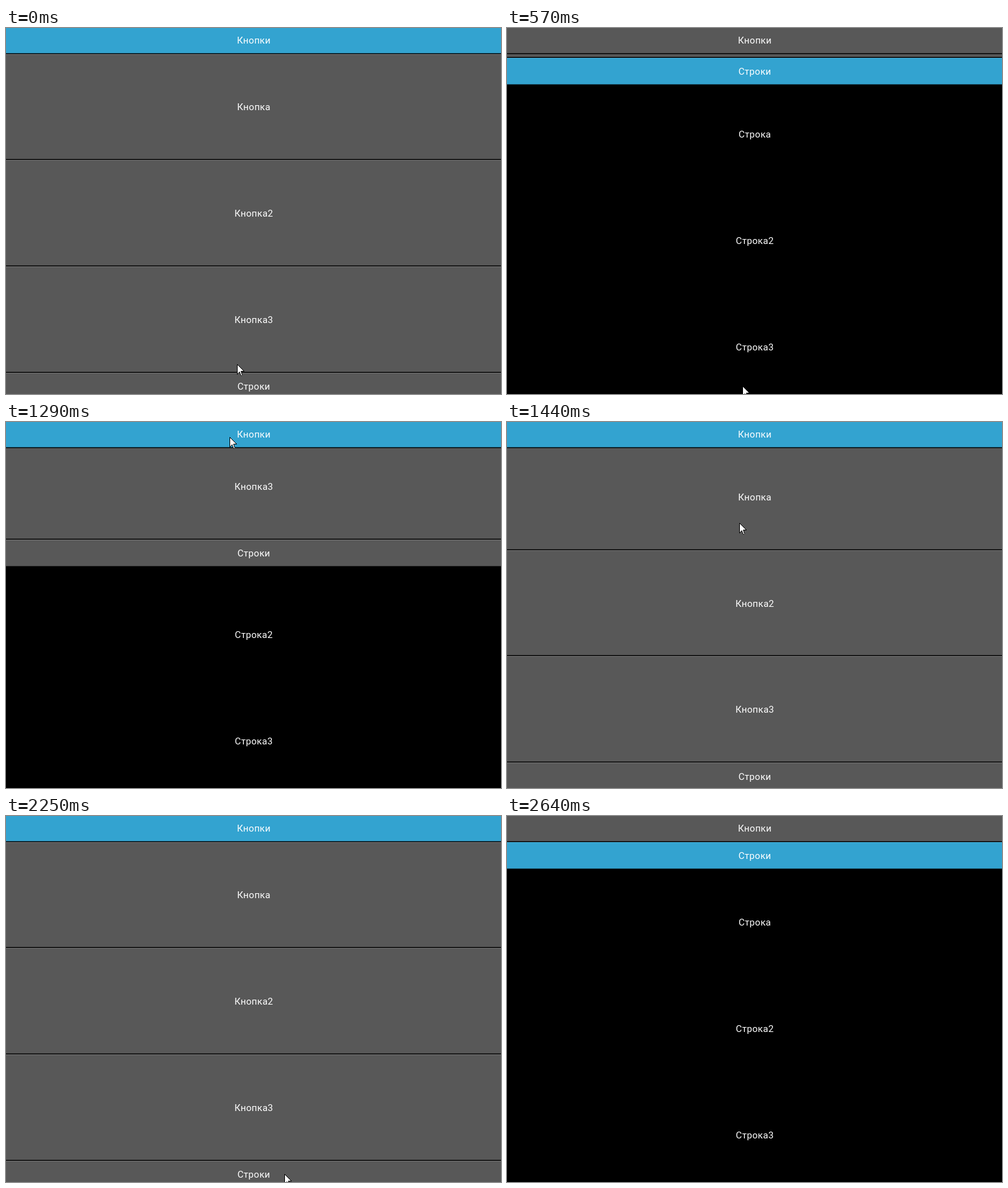
An HTML page with a canvas that plays this animation: 795x588 px, repeating every 3040 ms.

```html
<!DOCTYPE html>
<html lang="ru">
<meta charset="utf-8">
<title>Accordion</title>
<style>
html, body { margin: 0; width: 100%; height: 100%; overflow: hidden; background: #000 }
canvas { display: block }
</style>
<canvas id="stage" width="795" height="588"></canvas>
<script>
const W = 795, H = 588, LOOP = 3040, TOP = 42, BAR = 44, OPEN = 512, ROW = OPEN / 3;
const STEP = 140, EASE = 240;
const ctx = document.getElementById('stage').getContext('2d');
const GRAY = ['#585858', '#777', '#303030'];
const BLUE = ['#33a3d0', '#47b2dc', '#1c5971'];
const arrow = new Path2D('M.5 .5V16.5L4 12.5L6.5 18.5H7.5L8.5 17.5L6.5 11.5H11.5Z');

// Each act opens one section (lead: eased time already passed) and moves
// the pointer along key points [step, x, y].
const acts = [
  { start: 0, lead: EASE, lower: false, path: [[0, 371, 540], [2, 378, 575]] },
  { start: 420, lead: 11.85, lower: true,
    path: [[1, 378, 575], [2, 404, 529], [3, 363, 31], [4, 355, 9], [5, 359, 24]] },
  { start: 1290, lead: 11.75, lower: false,
    path: [[0, 359, 24], [2, 387, 300], [3, 436, 516], [5, 436, 540], [7, 447, 575]] },
  { start: 2370, lead: 23.7, lower: true, path: [[0, 447, 575], [1, 447, H]] }
];

function along(path, step) {
  const i = path.findIndex(p => p[0] >= step);
  if (i < 0) return path[path.length - 1].slice(1);
  const b = path[i], a = path[i - 1] || b;
  const k = a === b ? 0 : (step - a[0]) / (b[0] - a[0]);
  return [1, 2].map(j => Math.round(a[j] + (b[j] - a[j]) * k));
}

const easeOut = p => p >= 1 ? 1 : 1 - 2 ** (-10 * p);

function label(text, y) {
  ctx.fillStyle = '#fff';
  ctx.fillText(text, 398, Math.round(y + 5));
}

function band(color, y, h) {
  ctx.fillStyle = color;
  ctx.fillRect(0, y, W, h);
}

function button(text, top, height, [face, light, shade]) {
  const y = Math.floor(top), end = Math.floor(top + height);
  band(face, y, end - y);
  band(light, y, 1);
  band(shade, end - 2, 1);
  band('#000', end - 1, 1);
  label(text, top + height / 2);
}

function clipped(top, bottom, paint) {
  ctx.save();
  ctx.beginPath();
  ctx.rect(0, top, W, Math.max(0, bottom - top));
  ctx.clip();
  for (let i = 0; i < 3; i++) paint(i * ROW, i ? i + 1 : '');
  ctx.restore();
}

function pointer(x, y) {
  ctx.save();
  ctx.translate(x, y);
  ctx.fillStyle = '#fff';
  ctx.strokeStyle = '#000';
  ctx.fill(arrow);
  ctx.stroke(arrow);
  ctx.restore();
}

function draw(t) {
  const { start, lead, lower, path } = acts.filter(a => a.start <= t).pop();
  const step = Math.floor((t - start + 20) / STEP);
  const k = easeOut((step * STEP + lead) / EASE);
  const split = TOP + OPEN * (lower ? 1 - k : k);
  const edge = Math.floor(split);
  band('#000', 0, H);

  clipped(TOP, edge, (y, n) => button('Кнопка' + n, split - OPEN + y, ROW, GRAY));
  clipped(edge + BAR, H, (y, n) => label('Строка' + n, TOP + BAR + y + ROW / 2));
  button('Кнопки', TOP - BAR, BAR, lower ? GRAY : BLUE);
  button('Строки', split, BAR, lower ? BLUE : GRAY);
  pointer(...along(path, step));
}

function frame() {
  ctx.font = '15px Roboto, sans-serif';
  ctx.letterSpacing = '0.3px';
  ctx.textAlign = 'center';
  draw(performance.now() % LOOP);
  requestAnimationFrame(frame);
}
frame();
</script>
</html>
```
